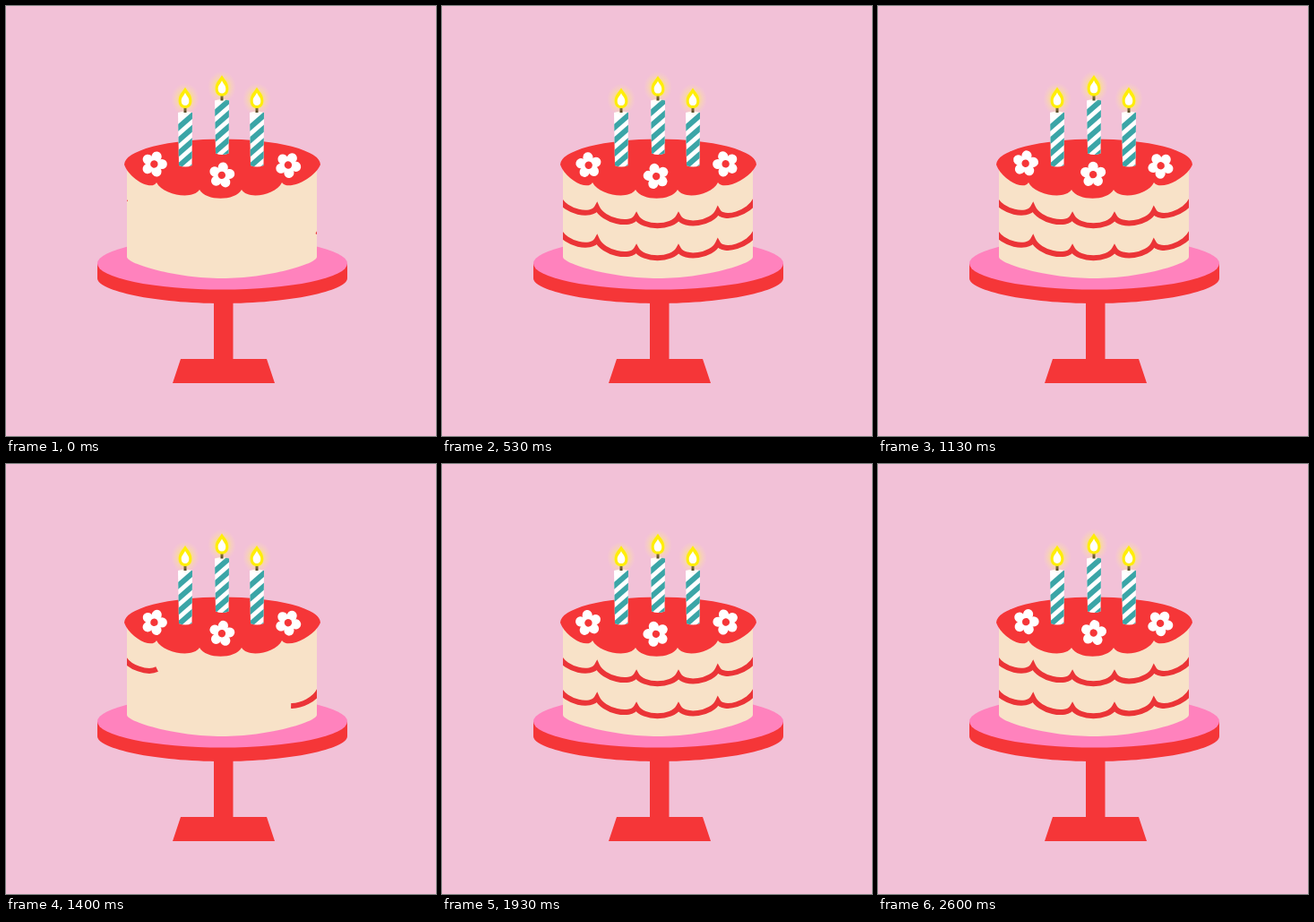
An HTML page that plays this animation: 480x480 px, repeating every 2.67 s.

```html
<!DOCTYPE html>
<html lang="en">
<head>
<meta charset="utf-8">
<title>Birthday cake</title>
<style>
  html, body { margin: 0; width: 100%; height: 100%; overflow: hidden; background: #f2c1d7; }
  svg { display: block; width: 100%; height: 100%; }
  .red { fill: #f53638; }
  .piping { fill: none; stroke: #eb3437; stroke-width: 6; stroke-miterlimit: 5; }
</style>
</head>
<body>
<svg viewBox="0 0 480 480">
  <defs>
    <path id="side" d="M135 178H347V280C347 288 292 304 241 304C190 304 135 288 135 280Z"/>
    <clipPath id="body"><use href="#side"/></clipPath>
    <clipPath id="stick"><path d="M-8 1Q0-2 8 1L7.5 60Q0 63-7 60Z"/></clipPath>
    <radialGradient id="glow">
      <stop offset=".35" stop-color="#fff04a" stop-opacity=".7"/>
      <stop offset=".65" stop-color="#ffe98a" stop-opacity=".35"/>
      <stop offset="1" stop-color="#ffe0b0" stop-opacity="0"/>
    </radialGradient>
    <g id="flame">
      <ellipse cy="-14" rx="16" ry="18" fill="url(#glow)"/>
      <path fill="#ffee08" d="M0-27C3-22 7.3-19 7.3-12C7.3-6.500 4-4 0-4C-4-4-7.3-6.500-7.3-12C-7.3-19-3-22 0-27Z"/>
      <path fill="#fff" d="M0-21C1-18 4.3-16 4.3-12C4.3-8.500 2.500-7 0-7C-2.500-7-4.3-8.500-4.3-12C-4.3-16-1-18 0-21Z"/>
    </g>
    <g id="flower"></g>
  </defs>

  <rect width="480" height="480" fill="#f2c1d7"/>

  <g class="red">
    <path d="M195 394H291L300 421H186Z"/>
    <path d="M232 325H253.500V396H232Z"/>
    <path d="M102 287H381V304C381 318 316 332 241.500 332C167 332 102 318 102 304Z"/>
  </g>
  <ellipse cx="241.500" cy="287.500" rx="139.500" ry="29" fill="#ff82bd"/>

  <use href="#side" fill="#f8e2c8"/>
  <g id="piping" clip-path="url(#body)"></g>
  <path id="icing" class="red"/>
  <g id="candles"></g>
  <g id="flowers"></g>
</svg>
<script>
const LOOP = 2670, STEP = 1000 / 15, CYCLE = 20, LAST = 39;
const $ = id => document.getElementById(id);

function add(parent, tag, attrs) {
  const el = document.createElementNS('http://www.w3.org/2000/svg', tag);
  for (const key in attrs) el.setAttribute(key, attrs[key]);
  return parent.appendChild(el);
}

// A chain of sagging curves through the given cusps.
function scallops(cusps, dip = 13, inset = .15) {
  let [x, y] = cusps[0], d = `M${x} ${y}`;
  for (const [nx, ny] of cusps.slice(1)) {
    const dx = (nx - x) * inset, dy = (ny - y) * inset;
    d += `C${x + dx} ${y + dy + dip} ${nx - dx} ${ny - dy + dip} ${nx} ${ny}`;
    [x, y] = [nx, ny];
  }
  return d;
}

$('icing').setAttribute('d',
  scallops([[132, 177], [168, 197], [216, 205], [263, 205], [308, 197], [351, 177]]) +
  'A109.5 28.5 0 0 0 132 177Z');

const cusps = [[131, 215], [173, 225], [217, 235.5], [264, 235.5], [308, 229], [350, 216]];
const lines = [{ dy: 0, dir: 1, steps: 6 }, { dy: 36, dir: -1, steps: 6.7 }].map(line => {
  const el = add($('piping'), 'path', {
    class: 'piping', d: scallops(cusps.map(([x, y]) => [x, y + line.dy]))
  });
  return { ...line, el, length: el.getTotalLength() };
});

for (let i = 0; i < 5; i++) {
  add($('flower'), 'ellipse', { cy: -8.6, rx: 5.6, ry: 5.9, fill: '#fff', transform: `rotate(${i * 72})` });
}
add($('flower'), 'circle', { r: 7.5, fill: '#fff' });
add($('flower'), 'circle', { r: 4.2, class: 'red' });

function candle(x, y, shift) {
  const g = add($('candles'), 'g', { transform: `translate(${x} ${y})` });
  const stick = add(g, 'g', { 'clip-path': 'url(#stick)' });
  add(stick, 'path', { d: 'M-9-3H9V65H-9Z', fill: '#fff' });
  for (let i = 0; i < 5; i++) {
    const mid = 11 + shift + i * 14.5;
    add(stick, 'path', { d: `M-12 ${mid + 10.5}L12 ${mid - 10.5}`, stroke: '#3ba5a7', 'stroke-width': 6 });
  }
  add(g, 'path', { d: 'M0-6V1', stroke: '#2e2008', 'stroke-width': 3 });
  return add(g, 'use', { href: '#flame' });
}
const flames = [candle(200, 118, 0), candle(241, 104.5, -3), candle(280, 118, 0)];

const flowers = [
  { x: 164.3, y: 176.8, tilt: 4, side: 1 },
  { x: 239.8, y: 189.2, tilt: -5, side: 1 },
  { x: 316, y: 177.2, tilt: -28, side: -1 }
].map(f => ({ ...f, el: add($('flowers'), 'use', { href: '#flower' }) }));

// Nearly linear, with a slight ease at both ends.
function ease(u) {
  u = Math.min(1, u);
  return .85 * u + .15 * u * u * (3 - 2 * u);
}

function draw(time) {
  const step = Math.min(LAST, Math.floor((time + 4) / STEP)) % CYCLE;
  const angle = (step - 1) / CYCLE * 2 * Math.PI;
  const cos = Math.cos(angle), sin = Math.sin(angle);

  for (const { el, dir, steps, length } of lines) {
    const hidden = .98 * (1 - ease(step / steps)) * length;
    el.style.strokeDasharray = hidden ? `${length} ${length}` : 'none';
    el.style.strokeDashoffset = dir * hidden;
  }
  for (const { x, y, tilt, side, el } of flowers) {
    el.setAttribute('transform',
      `translate(${x + 1.1 * side * cos} ${y + 1.1 * side * sin}) rotate(${tilt + 15 * side * cos})`);
  }
  for (const el of flames) el.setAttribute('transform', `scale(1 ${1 - .02 * sin})`);
}

const start = performance.now();
function tick() {
  draw((performance.now() - start) % LOOP);
  requestAnimationFrame(tick);
}
tick();
</script>
</body>
</html>
```
